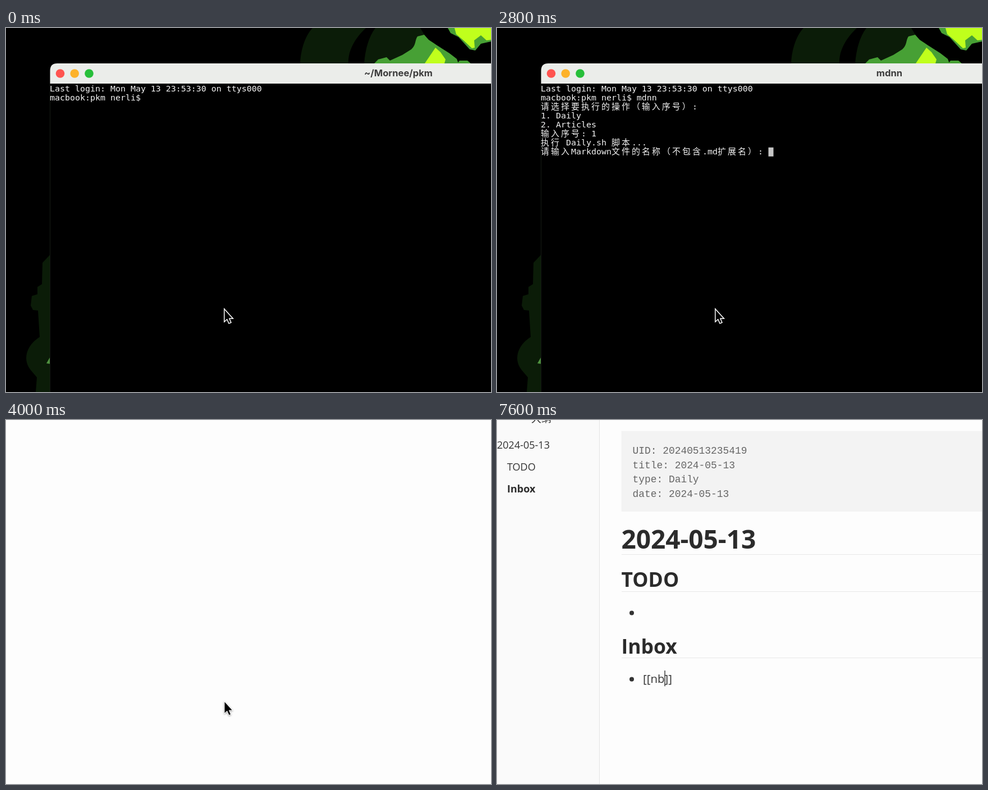
Animation, 864 px wide and 648 px high, one loop 8000 ms. Source, as an HTML page:

```html
<!DOCTYPE html>
<html lang="zh">
<head>
<meta charset="utf-8">
<style>
html, body { margin: 0; width: 100%; height: 100%; overflow: hidden; background: #000; }
svg { display: block; width: 864px; height: 648px; }
text { white-space: pre; }
#lines { font: 14.95px "DejaVu Sans Mono", monospace; fill: #f4f4f4; }
.wide { font-family: "Noto Sans CJK SC", "Noto Sans CJK", sans-serif; letter-spacing: 3.05px; }
#title { font: 700 16.6px Inter, sans-serif; text-anchor: middle; }
#page { font: 18px "Open Sans", "Noto Sans CJK SC", sans-serif; fill: #333; }
#page .bold { font-weight: 700; fill: #2b2b2b; }
#meta { font: 17.9px "Courier New", "Liberation Mono", monospace; fill: #666; }
</style>
</head>
<body>
<svg viewBox="0 0 864 648">
  <g id="desktop">
    <rect width="864" height="648"/>
    <g fill="#0b1c08">
      <path d="M524 63C525 40 532 15 546 0H641C622 18 609 40 610 63Z"/>
      <path d="M638 63C640 38 646 16 658 0H738L746 13 722 63Z"/>
      <path d="M79 403 65 418 64 456 56 461V474L46 477 44 494 48 502 57 503 60 550C44 560 36 574 36 588C37 606 48 612 55 622L53 648H79Z"/>
    </g>
    <path fill="#47a035" d="M656 63 663 56 678 52 684 58 706 48 722 38C731 30 728 22 733 15L745 12 753 21 768 31 790 45 803 55 806 63Z"/>
    <path fill="#c0ff1c" d="M746 63 765 35 774 43 783 56 781 63Z"/>
    <path fill="#47a035" d="M787 0 792 9 806 16 826 38 836 40 846 28 864 24V0Z"/>
    <path fill="#c0ff1c" d="M799 0 802 11 815 22 830 36 835 35 834 22 846 13 856 22 864 21V0Z"/>
    <path fill="#47a035" d="M804 63 808 58 822 58 828 63Z"/>
    <path fill="#4f9140" d="M79 585 72 597 79 598Z"/>
    <rect x="78" y="99" width="786" height="549" fill="#161b15"/>
    <rect x="79" y="99" width="785" height="549"/>
    <path id="bar" d="M78.500 99V76Q78.500 63 91.500 63H864V99Z"/>
    <g id="lights">
      <circle cx="96.500" cy="81" r="7.800"/><circle cx="122.200" cy="81" r="7.800"/><circle cx="148" cy="81" r="7.800"/>
    </g>
    <text id="title" x="699" y="86"></text>
    <g id="opening">
      <rect x="248" y="211" width="407" height="310" rx="4" fill="#4c4c4c"/>
      <circle cx="256" cy="217" r="2" fill="#7d4a45"/><circle cx="264" cy="217" r="2" fill="#7b6540"/><circle cx="272" cy="217" r="2" fill="#3f6b45"/>
      <text x="442" y="219" font-size="6" font-weight="700" font-family="Inter, sans-serif" fill="#161616">-05-13.md -</text>
    </g>
    <g id="lines"></g>
    <rect id="block"/>
  </g>
  <g id="blank"><rect width="864" height="648" fill="#fdfdfd"/></g>
  <g id="page">
    <rect width="182" height="648" fill="#fafafa"/>
    <path d="M182.500 0V648" stroke="#e3e3e3"/>
    <text x="61" y="4">大纲</text>
    <text x="0" y="51">2024-05-13</text>
    <text x="18" y="90">TODO</text>
    <text x="18" y="128.500" class="bold">Inbox</text>
    <rect x="221.500" y="19.500" width="643" height="143.500" fill="#f3f3f3"/>
    <g id="meta"></g>
    <text x="221.500" y="229" class="bold" font-size="46">2024-05-13</text>
    <text x="221.500" y="297" class="bold" font-size="35.500">TODO</text>
    <text x="221.500" y="415.500" class="bold" font-size="35.500">Inbox</text>
    <path d="M222 239.500H864M222 305.500H864M222 423.500H864" stroke="#e8e8e8"/>
    <circle cx="240" cy="343.500" r="4"/><circle cx="240" cy="461.500" r="4"/>
    <text id="note" x="260" y="468" font-size="20.400"></text>
    <rect id="caret" y="445" width="1.200" height="28" fill="#111"/>
  </g>
  <path id="mouse" d="M389.500 502V521.500L394 517.500 397.400 525 400 524 396.800 516.500H402.700Z" stroke="#fff" paint-order="stroke"/>
</svg>
<script>
const $ = id => document.getElementById(id);
const show = (id, on) => $(id).style.display = on ? '' : 'none';
const put = (el, attrs) => { for (const k in attrs) el.setAttribute(k, attrs[k]); };

const CELL = 9, LEFT = 78, ROW = 16.05;
const WIDE = /[\u2e80-\uffef]/;
const cols = s => [...s].reduce((n, c) => n + (WIDE.test(c) ? 2 : 1), 0);

const PROMPT = 'macbook:pkm nerli$ ';
const login = 'Last login: Mon May 13 23:53:30 on ttys000';
const menu = ['请选择要执行的操作（输入序号）:', '1. Daily', '2. Articles'];
const ask = '输入序号: ';
const named = ['执行 Daily.sh 脚本...', '请输入Markdown文件的名称（不包含.md扩展名）: '];
const made = "Markdown 文件 '/Users/nerli/Mornee/pkm/Daily/2024-05-13.md' 已创建。";

function terminalLines(t) {
  if (t < 1200) return [login, PROMPT + 'mdnn'.slice(0, Math.max(0, Math.floor(t / 200) - 1))];
  const out = [login, PROMPT + 'mdnn', ...menu, ask + (t < 2000 ? '' : '1')];
  if (t >= 2400) out.push(...named);
  if (t >= 3600) out.push(made, t < 3800 ? '' : '已执行选择的脚本。');
  if (t >= 3800) out.push(PROMPT);
  return out;
}

// Each run of narrow or wide characters starts on its own grid column.
function lineMarkup(line, row) {
  let x = LEFT;
  const runs = line.match(/[\u2e80-\uffef]+|[^\u2e80-\uffef]+/g) || [];
  const spans = runs.map(run => {
    const span = `<tspan x="${x}"${WIDE.test(run) ? ' class="wide"' : ''}>${run}</tspan>`;
    x += cols(run) * CELL;
    return span;
  });
  return `<text y="${Math.round(113 + row * ROW)}">${spans.join('')}</text>`;
}

function drawTerminal(t) {
  const lines = terminalLines(t), active = t < 3800, row = lines.length - 1;
  $('lines').innerHTML = lines.map(lineMarkup).join('');
  const x = LEFT + cols(lines[row]) * CELL, y = 100.3 + row * ROW;
  put($('block'), active
    ? { x: x + .5, y, width: 9, height: 16, fill: '#c6c6c6', stroke: 'none' }
    : { x: x + 1, y: y + .5, width: 8, height: 15, fill: 'none', stroke: '#ddd' });
  show('block', t >= 200);
  show('opening', !active);
  $('title').textContent = t >= 1200 && active ? 'mdnn' : '~/Mornee/pkm';
  put($('title'), { fill: active ? '#3c3c3c' : '#999b98' });
  put($('bar'), { fill: active ? '#ebedea' : '#dddfdc' });
  const colours = ['#ff5450', '#fdb22a', '#27bf3a'];
  [...$('lights').children].forEach((c, i) => put(c, { fill: active ? colours[i] : '#bcbdbb' }));
}

function drawPage(t) {
  const inner = t < 7000 ? '' : t < 7400 ? 'n' : 'nb';
  const pairs = t < 6000 ? 0 : t < 6400 ? 1 : 2;
  const note = $('note');
  note.textContent = '['.repeat(pairs) + inner + ']'.repeat(pairs);
  const before = pairs + inner.length;
  put($('caret'), {
    x: 260 + (before ? note.getSubStringLength(0, before) : 0),
    y: pairs ? 446 : 445
  });
  show('caret', t >= 4600 && (t < 5000 || t >= 5600));
}

$('meta').innerHTML = ['UID: 20240513235419', 'title: 2024-05-13', 'type: Daily', 'date: 2024-05-13']
  .map((s, i) => `<text x="241.500" y="${60 + i * 25.7}">${s}</text>`).join('');

const start = performance.now();
let last = -1;
function frame() {
  const t = Math.floor((performance.now() - start) % 8000 / 200) * 200;
  if (t !== last) {
    last = t;
    const dark = t < 4000;
    show('desktop', dark);
    show('blank', !dark);
    show('page', t >= 4400);
    show('mouse', t < 6000);
    $('mouse').style.filter = dark ? '' : 'drop-shadow(0 1px 1.5px #0006)';
    put($('mouse'), { 'stroke-width': dark ? 3 : 2 });
    dark ? drawTerminal(t) : drawPage(t);
  }
  requestAnimationFrame(frame);
}
frame();
</script>
</body>
</html>
```
